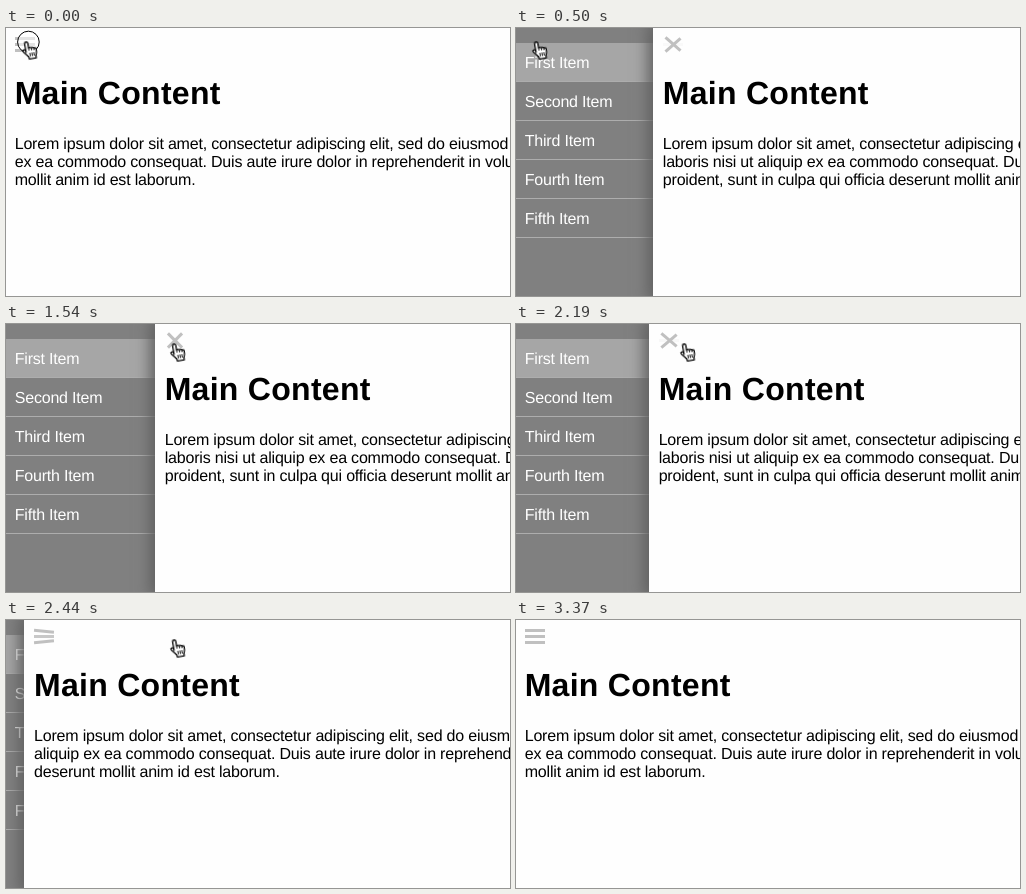
Animation of 504x268 px, one loop 3.98 s. Source, as an HTML page:

```html
<!DOCTYPE html>
<html lang="en">
<head>
<meta charset="utf-8">
<title>Slide-out menu</title>
<style>
  @property --open {
    syntax: "<number>";
    inherits: true;
    initial-value: 0;
  }

  html, body { margin: 0; width: 100%; height: 100%; overflow: hidden; }

  body {
    position: relative;
    background: #808080;
    font: 16px/18px "Liberation Sans", Arial, sans-serif;
    letter-spacing: -.19px;
    text-rendering: geometricPrecision;
    animation: toggle 3980ms infinite;
  }

  /* Puts the first text baseline exactly --base below the top */
  .line { display: flex; align-items: baseline; }
  .line::before { content: ""; height: var(--base); }

  .menu {
    position: absolute;
    top: 15px;
    left: 0;
    width: 150px;
    margin: 0;
    padding: 0;
    list-style: none;
    color: #fff;
  }
  .menu li {
    --base: 25px;
    box-sizing: border-box;
    height: 39px;
    padding-left: 8.7px;
    border-bottom: 1px solid #adadad;
  }
  .menu li:first-child { background: #a6a6a6; }

  main {
    position: absolute;
    top: 0;
    left: calc(var(--open) * 150px - 1px);
    width: 1441px;
    height: 100%;
    background: #fefefe;
    color: #000;
    box-shadow: 0 0 14px 5px #606060;
  }
  main > .line { position: absolute; top: 0; left: 9.7px; }
  h1, p { margin: 0; }
  .title { --base: 76px; }
  .text { --base: 121px; }
  h1 { font-size: 32px; line-height: 38px; letter-spacing: .28px; white-space: nowrap; }
  p { width: calc(1424px - var(--open) * 150px); }

  .icon { position: absolute; left: 10px; top: 15px; width: 20px; height: 3px; }
  .icon i { position: absolute; inset: 0; background: #c0c0c0; }
  .icon i:nth-child(1) {
    transform: translateY(calc((var(--open) - 1) * 6px)) rotate(calc(var(--open) * 45deg));
  }
  .icon i:nth-child(2) { opacity: calc(1 - var(--open)); }
  .icon i:nth-child(3) {
    transform: translateY(calc((1 - var(--open)) * 6px)) rotate(calc(var(--open) * -45deg));
  }

  .cursor {
    position: absolute;
    left: 0;
    top: 0;
    width: 1px;
    height: 1px;
    overflow: visible;
    animation: move 3980ms infinite;
  }
  .hand { animation: hand 3980ms step-end infinite; }
  .arrow { animation: arrow 3980ms step-end infinite; }
  .ring { animation: click 3980ms linear infinite; }

  @keyframes toggle {
    0%, 3.89% { --open: 0; animation-timing-function: ease; }
    17.09%, 53.62% { --open: 1; animation-timing-function: ease; }
    66.91%, 100% { --open: 0; }
  }
  @keyframes move {
    0%, 22% { transform: translate(22px, 14px); animation-timing-function: ease-in-out; }
    35.68% { transform: translate(167px, 20px); animation-timing-function: linear; }
    37.19%, 73.5% { transform: translate(170px, 20px); animation-timing-function: cubic-bezier(.4, 0, .8, .8); }
    84.67%, 100% { transform: translate(468px, 272px); }
  }
  @keyframes hand {
    0% { visibility: visible; }
    22.86% { visibility: hidden; }
    37.18% { visibility: visible; }
    74.37%, 100% { visibility: hidden; }
  }
  @keyframes arrow {
    0% { visibility: hidden; }
    22.86% { visibility: visible; }
    37.18% { visibility: hidden; }
    74.37% { visibility: visible; }
    84.67%, 100% { visibility: hidden; }
  }
  @keyframes click {
    0%, 3.01% { opacity: 1; transform: scale(1); }
    5%, 50.74% { opacity: 0; transform: scale(1); }
    50.75% { opacity: 1; transform: scale(.5); }
    52.3%, 53% { opacity: 1; transform: scale(1); }
    54.5%, 99.99% { opacity: 0; transform: scale(1); }
    100% { opacity: 1; transform: scale(1); }
  }
</style>
</head>
<body>
  <ul class="menu">
    <li class="line">First Item</li>
    <li class="line">Second Item</li>
    <li class="line">Third Item</li>
    <li class="line">Fourth Item</li>
    <li class="line">Fifth Item</li>
  </ul>

  <main>
    <div class="icon"><i></i><i></i><i></i></div>
    <div class="line title"><h1>Main Content</h1></div>
    <div class="line text">
      <p>Lorem ipsum dolor sit amet, consectetur adipiscing elit, sed do eiusmod
      tempor incididunt ut labore et dolore magna aliqua. Ut enim ad minim veniam,
      quis nostrud exercitation ullamco laboris nisi ut aliquip ex ea commodo
      consequat. Duis aute irure dolor in reprehenderit in voluptate velit esse
      cillum dolore eu fugiat nulla pariatur. Excepteur sint occaecat cupidatat non
      proident, sunt in culpa qui officia deserunt mollit anim id est laborum.</p>
    </div>
  </main>

  <svg class="cursor" aria-hidden="true">
    <circle class="ring" cx=".4" r="10.8" fill="#fff" fill-opacity=".55" stroke="#000"/>
    <g class="hand" stroke="#000" stroke-linejoin="round" stroke-linecap="round">
      <g transform="translate(-2.2 -.6) rotate(-10) scale(1.08) translate(-6 0)">
        <path fill="#fff" stroke-width="1.2" d="M4.5 10V2.1a1.5 1.5 0 0 1 3 0V6.4q1.3-.9 2.4.3 1.4-.7 2.3.6 2-.5 2.1 1.6c.1 3-.8 4-1.3 5.6v2.2H6.4v-1.8C5.1 13.1 3.6 11.3 2.2 9.3c-1-1.6.8-2.8 2.3-.9z"/>
        <path fill="none" stroke-width=".9" d="M7.5 6.5V8.5M9.900 6.800V8.700M12.2 7.4V9M7.8 11.5V14M9.700 11.500V14M11.500 11.500V14"/>
      </g>
    </g>
    <path class="arrow" fill="#000" stroke="#fff" stroke-width=".9"
      d="M.5-.8V14L3.7 11 6 16.2 8.2 15.2 6 10.2H10.6Z"/>
  </svg>
</body>
</html>
```
